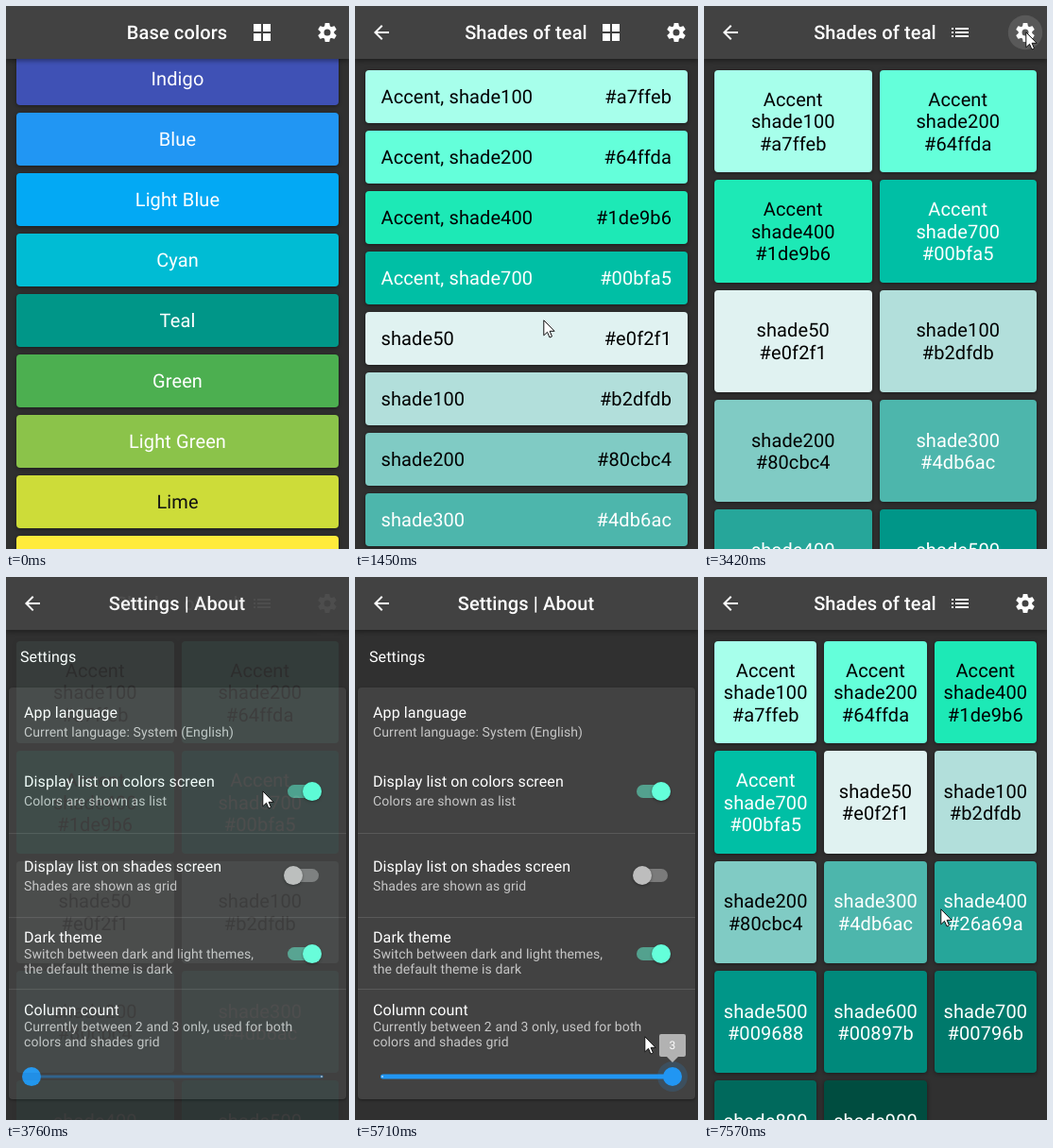
An HTML page for the animation above (7.64 s loop, 363 by 575 pixels).

```html
<!DOCTYPE html>
<html lang="en">
<head>
<meta charset="utf-8">
<title>Color shades app</title>
<style>
html, body { margin: 0; width: 100%; height: 100%; overflow: hidden; background: #303030; }
#stage { position: fixed; left: 0; top: 0; width: 363px; height: 575px; overflow: hidden;
  font: 400 20px Roboto, sans-serif; letter-spacing: .11px; text-rendering: geometricPrecision;
  color: #fff; white-space: nowrap; }
.page { position: absolute; inset: 0; background: #303030; }
.bar { position: absolute; left: 0; top: 0; width: 363px; height: 56px; background: #424242;
  box-shadow: 0 2px 5px rgba(0,0,0,.4); }
.title { position: absolute; left: 0; width: 362px; line-height: 56px; text-align: center; font-weight: 500; }
.icon { position: absolute; top: 16px; width: 24px; height: 24px; fill: #fff; }
.tile { position: absolute; left: 11px; width: 341px; height: 56px; border-radius: 4px; overflow: hidden;
  box-sizing: border-box; line-height: 56px; }
.tile, .cell { box-shadow: 0 1px 4px rgba(0,0,0,.45); }
.base { text-align: center; }
.shade { display: flex; justify-content: space-between; padding: 0 17px 0 16.5px; }
.cell { position: absolute; height: 108.3px; border-radius: 4px; display: flex; align-items: center;
  justify-content: center; text-align: center; line-height: 23.4px; white-space: pre;
  box-sizing: border-box; padding-top: 2px; }
.ripple { position: absolute; border-radius: 50%; background: #fff; width: 2px; height: 2px; opacity: 0; }
.card { position: absolute; left: 3px; top: 117px; width: 357px; height: 436px; border-radius: 4px;
  background: #424242; box-shadow: 0 1px 3px rgba(0,0,0,.4); }
.line { position: absolute; left: 3px; width: 357px; height: 1px; background: rgba(255,255,255,.12); }
.head, .sub { position: absolute; line-height: 20px; font-size: 16px; }
.sub { font-size: 14px; color: rgba(255,255,255,.7); }
.track { position: absolute; left: 297.5px; width: 33px; height: 14px; border-radius: 7px; }
.knob { position: absolute; width: 20px; height: 20px; border-radius: 50%; box-shadow: 0 1px 3px rgba(0,0,0,.4); }
.layer { position: absolute; left: 0; top: 0; width: 363px; height: 575px; }
#cursor { position: absolute; left: 0; top: 0; width: 14px; height: 22px; overflow: visible; }
</style>
</head>
<body>
<div id="stage"></div>
<script>
const LOOP = 7640, FRAMES = 110, STEP = LOOP / FRAMES;
const stage = document.getElementById('stage');

function add(parent, cls, css = '', text = '') {
  const el = document.createElement('div');
  el.className = cls;
  el.style.cssText = css;
  el.textContent = text;
  parent.appendChild(el);
  return el;
}
function icon(parent, x, shape) {
  parent.insertAdjacentHTML('beforeend',
    `<svg class="icon" viewBox="0 0 24 24" style="left:${x - 12}px">${shape}</svg>`);
  return parent.lastElementChild;
}

const tooth = [0, 60, 120, 180, 240, 300].map(a =>
  `<path d="M9 6.2 9.6 2.5Q9.7 2 10.2 2H13.8Q14.3 2 14.4 2.5L15 6.2Z" transform="rotate(${a} 12 12)"/>`).join('');
const ICONS = {
  back: '<path d="M20 11H7.83l5.59-5.59L12 4l-8 8 8 8 1.41-1.41L7.83 13H20z"/>',
  grid: '<path d="M3 3h8v8H3zM13 3h8v8h-8zM3 13h8v8H3zM13 13h8v8h-8z"/>',
  list: '<path d="M3 7h2v2H3zM7 7h14v2H7zM3 11h2v2H3zM7 11h14v2H7zM3 15h2v2H3zM7 15h14v2H7z"/>',
  gear: `<circle cx="12" cy="12" r="5.4" fill="none" stroke="#fff" stroke-width="3.8"/>${tooth}`
};

function page() { return add(stage, 'page'); }
function bar(parent, title) {
  const el = add(parent, 'bar');
  add(el, 'title', '', title);
  return el;
}

// Base colors
const basePage = page();
const BASE = [['Indigo', '#3f51b5'], ['Blue', '#2196f3'], ['Light Blue', '#03a9f4'], ['Cyan', '#00bcd4'],
  ['Teal', '#009688'], ['Green', '#4caf50'], ['Light Green', '#8bc34a'], ['Lime', '#cddc39'], ['Yellow', '#ffeb3b']];
let tealRipple;
BASE.forEach(([name, color], i) => {
  const ink = i > 6 ? '#111' : '#fff';
  const tile = add(basePage, 'tile base', `top:${49 + 64 * i}px;background:${color};color:${ink}`, name);
  if (name === 'Teal') tealRipple = add(tile, 'ripple', 'left:188px;top:27px');
});
const baseBar = bar(basePage, 'Base colors');
icon(baseBar, 271, ICONS.grid);
icon(baseBar, 340, ICONS.gear);

// Shades of teal
const shadePage = page();
const SHADES = [['Accent, shade100', '#a7ffeb'], ['Accent, shade200', '#64ffda'], ['Accent, shade400', '#1de9b6'],
  ['Accent, shade700', '#00bfa5'], ['shade50', '#e0f2f1'], ['shade100', '#b2dfdb'], ['shade200', '#80cbc4'],
  ['shade300', '#4db6ac'], ['shade400', '#26a69a'], ['shade500', '#009688'], ['shade600', '#00897b'],
  ['shade700', '#00796b'], ['shade800', '#00695c'], ['shade900', '#004d40']];
const inkOf = i => i === 3 || i > 6 ? '#fff' : '#000';

const listView = add(shadePage, 'layer');
SHADES.forEach(([name, hex], i) => {
  const tile = add(listView, 'tile shade', `top:${68 + 64 * i}px;background:${hex};color:${inkOf(i)}`);
  add(tile, '', '', name);
  add(tile, '', '', hex);
});
function gridView(cols) {
  const view = add(shadePage, 'layer');
  const w = (341 - 8 * (cols - 1)) / cols;
  SHADES.forEach(([name, hex], i) => {
    const x = 11 + (i % cols) * (w + 8), y = 68 + Math.floor(i / cols) * 116.33;
    add(view, 'cell', `left:${x}px;top:${y}px;width:${w}px;background:${hex};color:${inkOf(i)}`,
      name.replace(', ', '\n') + '\n' + hex);
  });
  return view;
}
const grid2 = gridView(2), grid3 = gridView(3);
const shadeBar = bar(shadePage, 'Shades of teal');
icon(shadeBar, 28, ICONS.back);
const gridIcon = icon(shadeBar, 271, ICONS.grid);
const listIcon = icon(shadeBar, 271, ICONS.list);
icon(shadeBar, 340, ICONS.gear);
const gearRipple = add(shadeBar, 'ripple', 'left:339px;top:27px');

// Settings
const setPage = page();
const setBar = bar(setPage, 'Settings | About');
icon(setBar, 28, ICONS.back);
const backRipple = add(setBar, 'ripple', 'left:27px;top:27px');
add(setPage, 'card');
[271, 360, 436].forEach(y => add(setPage, 'line', `top:${y}px`));
const label = (cls, x, y, text) => add(setPage, cls, `left:${x}px;top:${y - 10}px`, text);
label('head', 15, 85, 'Settings');
[[144, 'App language', 165, 'Current language: System (English)'],
 [217, 'Display list on colors screen', 238, 'Colors are shown as list'],
 [306.5, 'Display list on shades screen', 327.5, 'Shades are shown as grid'],
 [382, 'Dark theme', 400, 'Switch between dark and light themes,', 'the default theme is dark'],
 [458.5, 'Column count', 476.5, 'Currently between 2 and 3 only, used for both', 'colors and shades grid']
].forEach(([y, head, subY, ...subs]) => {
  label('head', 19, y, head);
  subs.forEach((s, i) => label('sub', 19, subY + 16 * i, s));
});
function toggle(y, on) {
  add(setPage, 'track', `top:${y - 7}px;background:${on ? 'rgba(100,255,218,.5)' : 'rgba(255,255,255,.3)'}`);
  add(setPage, 'knob', `left:${on ? 313.5 : 294}px;top:${y - 10}px;background:${on ? '#64ffda' : '#bdbdbd'}`);
}
toggle(226.5, true);
toggle(315.5, false);
toggle(398.5, true);
setPage.insertAdjacentHTML('beforeend', `
<svg class="layer" viewBox="0 0 363 575">
  <rect x="27" y="527.5" width="309" height="3" rx="1.5" fill="#2196f3" opacity=".45"/>
  <rect id="active" x="27" y="526.5" height="5" rx="2.5" fill="#2196f3"/>
  <circle cx="29" cy="529" r="1" fill="#fff" opacity=".6"/>
  <circle cx="334" cy="529" r="1" fill="#fff" opacity=".6"/>
  <g id="thumb">
    <circle id="halo" fill="#2196f3" opacity=".16"/>
    <circle r="10" fill="#2196f3"/>
    <g id="tip">
      <path d="M-12 -45H12Q14 -45 14 -43V-23Q14 -21 12 -21H6L0 -15 -6 -21H-12Q-14 -21 -14 -23V-43Q-14 -45 -12 -45Z" fill="#b2b2b2"/>
      <text id="count" y="-28.8" text-anchor="middle" font-size="12" fill="#fff"></text>
    </g>
  </g>
</svg>`);
const [active, thumb, halo, tip, count] =
  ['active', 'thumb', 'halo', 'tip', 'count'].map(id => document.getElementById(id));

stage.insertAdjacentHTML('beforeend', `
<svg id="cursor"><path d="M.8 .8V16.8L4.5 13.3 7 19 9.5 17.9 7.1 12.3H12.1Z"
  fill="#fff" stroke="#111" stroke-width="1"/></svg>`);
const cursor = document.getElementById('cursor');

// Motion
const clamp = v => Math.max(0, Math.min(1, v));
const ramp = (t, from, to) => clamp((t - from) / (to - from));
const smooth = p => p * p * (3 - 2 * p);
function bezier(x1, y1, x2, y2) {
  const at = (a, b, s) => 3 * a * s * (1 - s) ** 2 + 3 * b * s * s * (1 - s) + s ** 3;
  return x => {
    let lo = 0, hi = 1;
    for (let i = 0; i < 24; i++) {
      const mid = (lo + hi) / 2;
      if (at(x1, x2, mid) < x) lo = mid; else hi = mid;
    }
    return at(y1, y2, lo);
  };
}
const slide = bezier(.4, 0, .2, 1), fade = bezier(.42, 0, 1, 1);

// time, x, y
const POINTER = [[0, 318, 576], [830, 196, 337], [1040, 199, 332], [1560, 199, 332], [2290, 268, 19],
  [2640, 268, 19], [3120, 340, 27], [3520, 340, 27], [3750, 271, 226], [4130, 271, 226], [4860, 12, 521],
  [5000, 10, 521], [5500, 324, 514], [5640, 306, 486], [5740, 306, 486], [6380, 30, 10],
  [7010, 30, 10], [7560, 250, 351], [LOOP, 250, 351]];

function pointerAt(t) {
  const i = Math.max(1, POINTER.findIndex(k => k[0] >= t));
  const [t0, x0, y0] = POINTER[i - 1], [t1, x1, y1] = POINTER[i];
  const p = smooth(ramp(t, t0, t1));
  return [x0 + (x1 - x0) * p, y0 + (y1 - y0) * p];
}
function show(el, on) { el.style.display = on ? '' : 'none'; }
function route(el, p) {
  show(el, p > 0);
  el.style.opacity = fade(p);
  el.style.transform = `translateY(${143.75 * (1 - slide(p))}px)`;
}
function splash(el, radius, alpha) {
  el.style.transform = `scale(${radius})`;
  el.style.opacity = alpha;
}

function render(t) {
  const asGrid = t >= 2490, wide = t >= 5000;
  route(shadePage, ramp(t, 1145, 1445));
  route(setPage, t < 6000 ? ramp(t, 3462, 3762) : 1 - ramp(t, 6494, 6794));
  show(listView, !asGrid);
  show(grid2, asGrid && !wide);
  show(grid3, asGrid && wide);
  show(gridIcon, !asGrid);
  show(listIcon, asGrid);

  splash(tealRipple, 190 * ramp(t, 880, 1180), .12 * ramp(t, 880, 930) * (1 - ramp(t, 1080, 1240)));
  splash(gearRipple, 35 * ramp(t, 3320, 3480), .12 * ramp(t, 3320, 3400) * (1 - ramp(t, 3560, 3760)));
  splash(backRipple, 35 * ramp(t, 6400, 6560), .12 * ramp(t, 6400, 6480));

  const x = 27 + 309 * smooth(ramp(t, 5250, 5340));
  thumb.setAttribute('transform', `translate(${x} 529)`);
  active.setAttribute('width', x - 27);
  halo.setAttribute('r', 24 * ramp(t, 4980, 5080) * (1 - ramp(t, 5650, 5786)));
  tip.setAttribute('transform', `scale(${ramp(t, 4980, 5080) * (1 - ramp(t, 5850, 5950))})`);
  count.textContent = t < 5250 ? '2' : '3';

  const [cx, cy] = pointerAt(t);
  cursor.style.transform = `translate(${cx}px,${cy}px)`;
}

// The screen updates on a fixed step, so time is held between steps.
const start = performance.now();
function tick(now) {
  const t = Math.max(0, now - start) % LOOP;
  render(Math.min(FRAMES - 1, Math.floor((t + 12) / STEP)) * STEP);
  requestAnimationFrame(tick);
}
render(0);
requestAnimationFrame(tick);
</script>
</body>
</html>
```
